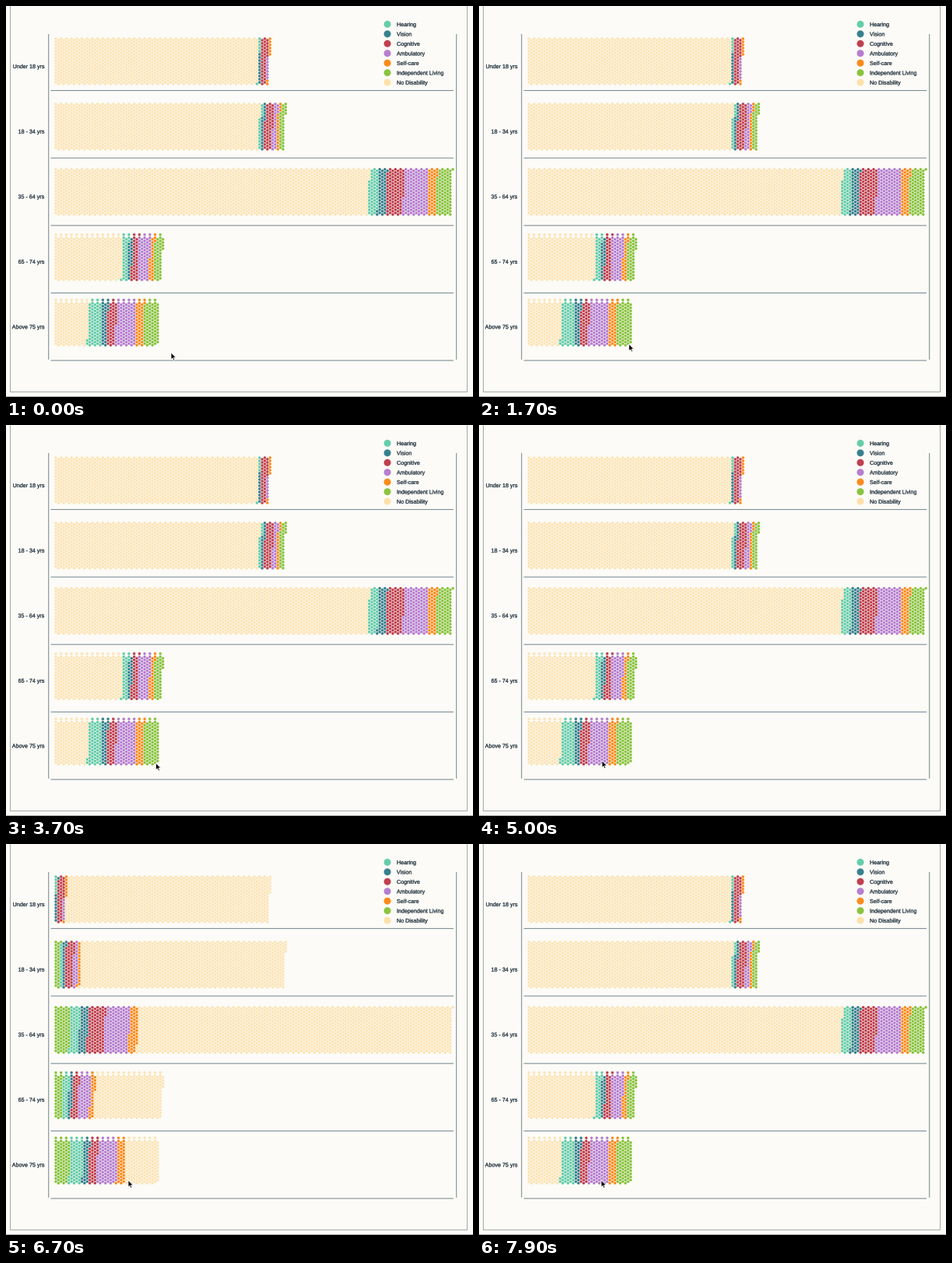
Animation of 600x502 px, one loop 8 s. Source, as a matplotlib script:

```python
import numpy as np
import matplotlib.pyplot as plt
from matplotlib.animation import FuncAnimation
from matplotlib.colors import to_rgba
from matplotlib.patches import Circle, Polygon
from matplotlib.patheffects import Normal, Stroke

W, H, DPI = 600, 502, 64
PT = 72 / DPI  # points per pixel
FRAMES, STEP = 80, 100

plt.rcParams["font.family"] = "Liberation Sans"
INK, RULE, BORDER, BACK = "#3a4852", "#7f9097", "#a3aaa8", "#fcfbf7"

# name, colour, cases per thousand people: young, middle-aged, old
DISABILITIES = [
    ("Hearing", "#66cdaa", (4.9, 23.7, 128)),
    ("Vision", "#38818f", (8.1, 21, 57)),
    ("Cognitive", "#c0404f", (29, 43, 81)),
    ("Ambulatory", "#b67ed0", (5.7, 61.8, 188)),
    ("Self-care", "#fb8b1b", (6.5, 21, 77.7)),
    ("Independent Living", "#8ac440", (14.2, 38.6, 145)),
]
PALE = "#fde1ab"
COLORS = np.array([to_rgba(c) for _, c, _ in DISABILITIES] + [to_rgba(PALE, 0.85)])
GROUPS = {"Under 18 yrs": 1236, "18 - 34 yrs": 1324, "35 - 64 yrs": 2281,
          "65 - 74 yrs": 599, "Above 75 yrs": 579}

ROWS, ROW, COL = 15, 4.0, 3.356
LEFT, TOP, BAND = 64, 42, 83.85


def cases(group, total):
    """Dots per category; rates grow geometrically between the key ages."""
    rates = [np.exp(np.interp(group, (0, 2, 4), np.log(r))) for *_, r in DISABILITIES]
    if group == 0:
        rates[-1] = 0  # independent living counts adults only
    counts = [round(r * total / 1000) for r in rates]
    return counts + [total - sum(counts)]


def pack(group, total):
    """Honeycomb positions, filled column by column from the left."""
    short = int(group > 2)  # older groups have one dot less in odd columns
    pair, k = np.divmod(np.arange(total), 2 * ROWS - short)
    odd = k >= ROWS
    x = LEFT + COL * (2 * pair + odd)
    y = TOP + BAND * group + ROW * (k + odd * (0.5 + short - ROWS))
    return np.column_stack([x, y])


def paint(counts, order):
    return np.repeat(COLORS[order], np.take(counts, order), axis=0)


def text(x, y, s, **kw):
    t = ax.text(x, y, s, color=INK, fontsize=7.15 * PT, **kw)
    t.set_path_effects([Stroke(linewidth=0.22 * PT, foreground=INK), Normal()])


def line(xs, ys, color=RULE, width=1.1):
    ax.plot(xs, ys, color=color, lw=width * PT, solid_capstyle="butt", snap=False)


fig = plt.figure(figsize=(W / DPI, H / DPI), dpi=DPI, facecolor=BACK)
ax = fig.add_axes([0, 0, 1, 1])
ax.set_xlim(0, W)
ax.set_ylim(H, 0)
ax.axis("off")

# page border and chart rules
line([5.5, 5.5, 592.5, 592.5], [-2, 495.5, 495.5, -2], BORDER, 1)
line([0, W], [501.5, 501.5], BORDER, 1)
for x in (54.7, 578.7):
    line([x, x], [36, 454])
for i in range(5):
    y = 108.5 + 86.65 * i
    line([57.5, 575], [y, y])

legend = [(name, color) for name, color, _ in DISABILITIES] + [("No Disability", PALE)]
for i, (name, color) in enumerate(legend):
    y = 23.4 + 12.45 * i
    ax.add_patch(Circle((490, y), 4.5, fc=color, ec="none"))
    text(502, y + 2.7, name)

spots, none_first, none_last = [], [], []
for i, (name, total) in enumerate(GROUPS.items()):
    text(49.5, 80 + 83.6 * i, name, ha="right")
    counts = cases(i, total)
    spots.append(pack(i, total))
    none_first.append(paint(counts, np.roll(range(7), 1)))
    none_last.append(paint(counts, [*np.roll(range(6), 1), 6]))
spots, none_first, none_last = map(np.vstack, (spots, none_first, none_last))
dots = ax.scatter(*spots.T, s=(3.5 * PT) ** 2, c=none_first, linewidths=0, zorder=3)

# pointer: half an outline, mirrored and tilted to the left
half = np.array([(0, 0), (3.4, 8.2), (0.8, 7.2), (0.8, 10.6)])
outline = np.vstack([half, half[:0:-1] * (-1, 1)])
tilt = np.radians(23)
turn = np.array([(np.cos(tilt), -np.sin(tilt)), (np.sin(tilt), np.cos(tilt))])
arrow = outline @ turn
cursor = Polygon(arrow, closed=True, fc="black", ec="white", lw=0.7 * PT, zorder=5)
ax.add_patch(cursor)

# start, end, destination
START = (212, 445)
MOVES = [(100, 900, (192.5, 434)), (4600, 4900, (158, 431)), (6100, 6200, (157, 431.7))]
SORT_ON, SORT_OFF = 6200, 7000


def pointer(t):
    pos = np.array(START, float)
    for start, end, goal in MOVES:
        u = np.clip((t - start) / (end - start), 0, 1)
        pos += (np.array(goal) - pos) * u * u * (3 - 2 * u)
    return pos


def update(n):
    t = n * STEP
    cursor.set_xy(arrow + pointer(t))
    dots.set_facecolor(none_last if SORT_ON <= t < SORT_OFF else none_first)
    return dots, cursor


anim = FuncAnimation(fig, update, frames=FRAMES, interval=STEP, repeat=True,
                     repeat_delay=0, blit=False)
plt.show()
```
